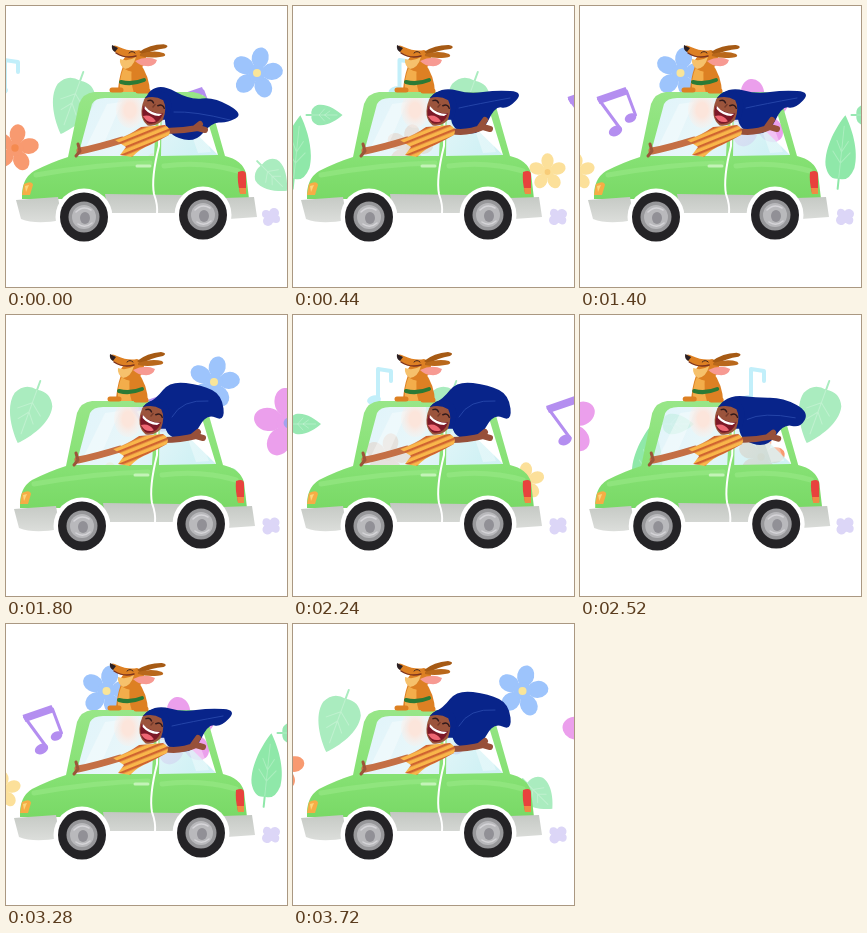
Recreate the animation shown at these times as an HTML page. Size 281 px wide and 281 px high, loop 3760 ms.

```html
<!DOCTYPE html>
<html lang="en">
<head>
<meta charset="utf-8">
<title>Road trip</title>
<style>
html, body { margin: 0; width: 100%; height: 100%; overflow: hidden; background: #fff; }
svg { display: block; width: 100vw; height: 100vh; }
.line { fill: none; stroke-linecap: round; stroke-linejoin: round; }
</style>
</head>
<body>
<svg viewBox="0 0 281 281">
  <defs>
    <linearGradient id="paint" x2="0" y2="1">
      <stop offset="0" stop-color="#98e688"/><stop offset=".6" stop-color="#86e174"/><stop offset="1" stop-color="#79d966"/>
    </linearGradient>
    <linearGradient id="glass" x2="1" y2=".3">
      <stop offset="0" stop-color="#d8f1f9"/><stop offset=".5" stop-color="#e2f4f8"/><stop offset="1" stop-color="#c6eef2"/>
    </linearGradient>
    <linearGradient id="chrome" x2="0" y2="1">
      <stop offset="0" stop-color="#c3c7c2"/><stop offset="1" stop-color="#dcdedb"/>
    </linearGradient>
    <radialGradient id="seat"><stop offset=".4" stop-color="#fce5db"/><stop offset="1" stop-color="#fceee8" stop-opacity=".3"/></radialGradient>
    <pattern id="stripes" width="6" height="6" patternUnits="userSpaceOnUse" patternTransform="rotate(68)">
      <rect width="6" height="6" fill="#f9b64a"/><rect width="2.4" height="6" fill="#cf6430"/>
    </pattern>
    <g id="wheel">
      <circle r="28.5" fill="#fff"/>
      <ellipse rx="24" ry="24.5" fill="#242326"/>
      <circle r="15.5" fill="#97979a"/>
      <circle r="12" fill="#b9b9bc"/>
      <ellipse cx="1" cy="1" rx="5" ry="6" fill="#919096"/>
      <path class="line" d="M-8 -5Q-1 -12 7 -7M-6 7Q1 12 8 6" stroke="#d5d4d8" stroke-width="1.5"/>
    </g>
  </defs>

  <g id="belt"></g>

  <g id="ride">
    <g id="dog">
      <path d="M110 88Q110 74 115 60L131 56Q142 70 142 88Z" fill="#dd8023"/>
      <path d="M112 86Q111 72 116 61L124 61Q122 76 126 87Z" fill="#f3ad4b"/>
      <path d="M104 41Q106 38 111 41Q122 46 131 44Q139 46 138 54Q135 64 125 66Q114 64 113 57L117 51Q107 49 104 41Z" fill="#dd8023"/>
      <path d="M112 53Q120 56 128 51Q125 62 117 63Q111 59 112 53Z" fill="#f6c16c"/>
      <path class="line" d="M108 47Q117 53 128 50" stroke="#7b3320" stroke-width="1.5"/>
      <path class="line" d="M121 47Q124 44 127 47" stroke="#41251d"/>
      <path d="M104 39L110 42L107 46Q103 44 104 39Z" fill="#2c2023"/>
      <path d="M127 55Q139 49 149 54Q147 61 138 60Q132 60 127 55Z" fill="#f79a92"/>
      <g id="ears" fill="#a65a14">
        <path d="M131 46Q141 38 155 37Q162 38 157 41Q145 43 135 49Z"/>
        <path d="M132 48Q146 43 156 46Q160 49 152 50Q141 52 132 50Z" fill="#b9681b"/>
      </g>
      <path class="line" d="M113 76Q124 79 136 74" stroke="#2b7a35" stroke-width="4"/>
    </g>

    <path d="M69 151L84 92H152L211 150Z" fill="url(#glass)" opacity=".8"/>
    <path d="M78 141L99 98L114 96L94 142ZM172 96L184 94L203 146L190 147Z" fill="#fff" opacity=".35"/>
    <ellipse cx="122" cy="104" rx="14" ry="18" fill="url(#seat)"/>
    <path fill="url(#paint)" fill-rule="evenodd" d="M14 193Q13 173 26 165Q44 156 60 151L71 98Q75 87 86 86L185 86Q198 88 202 97L217 150Q234 154 238 167L241 193Z
      M70 150L146 150L149 92L97 92Q87 92 84 98ZM153 150L210 149L195 100Q192 94 184 92L154 92Z"/>
    <path class="line" d="M28 169Q90 158 142 157M156 160Q195 155 230 165" stroke="#a0eb8f" stroke-width="5" opacity=".45"/>
    <path d="M97 188L174 189L172 207L100 207ZM8 194L50 191L54 214Q28 219 13 213ZM217 192L246 191L249 211L221 213Z" fill="url(#chrome)"/>
    <path class="line" d="M152 89L151 140Q143 172 146 188Q150 199 149 208" stroke="#fff" stroke-width="2"/>
    <path class="line" d="M129 160H142" stroke="#c4f3b8" stroke-width="3"/>
    <path d="M230 166Q238 163 238 169L238 187H232Q229 175 230 166Z" fill="#e8423d"/>
    <path d="M231 182H238V188H232Z" fill="#f08a44"/>
    <path d="M16 178Q24 174 25 179L22 189H14Z" fill="#f6ad45"/>
    <path d="M17 180L21 179L18 186Z" fill="#fbd67c"/>
    <use href="#wheel" x="76" y="211"/>
    <use href="#wheel" x="195" y="209"/>
    <path class="line" d="M104 84H113M130 85H140" stroke="#dd8023" stroke-width="5"/>

    <path id="hair" fill="#08248a"/>
    <path id="shine" class="line" stroke="#2444a8"/>
    <path class="line" d="M72 145Q88 142 114 134" stroke="#c46f45" stroke-width="7"/>
    <path class="line" d="M70 138L72 145L68 150" stroke="#9c5539" stroke-width="3"/>
    <path id="arm" class="line" stroke="#97503a" stroke-width="6"/>
    <path d="M107 134Q122 129 133 121L157 119Q164 123 161 129Q152 134 142 139Q133 142 124 151L112 149L118 141Z" fill="url(#stripes)"/>
    <g transform="rotate(22 147 104)">
      <path d="M133 98Q134 88 148 88Q160 91 160 104Q157 119 146 121Q133 117 133 98Z" fill="#9b543c"/>
      <path d="M133 97Q137 84 150 84Q162 87 163 108L158 110Q158 98 151 92Q141 90 133 97Z" fill="#08248a"/>
      <path d="M135 104Q145 109 156 104Q156 118 145 119Q135 116 135 104Z" fill="#7c1827"/>
      <path d="M136 104Q145 109 155 105L153 108Q145 111 137 107Z" fill="#fff"/>
      <path d="M138 114Q145 109 152 114Q146 120 138 114Z" fill="#ee6673"/>
      <path class="line" d="M137 98Q140 95 143 98M148 99Q152 95 155 99" stroke="#30191b" stroke-width="1.4"/>
      <path class="line" d="M145 99L144 102" stroke="#753a2a" stroke-width="1.5"/>
    </g>
  </g>

  <g id="puff" fill="#dcd6f7">
    <circle cx="260" cy="208" r="4"/><circle cx="268" cy="207" r="5"/><circle cx="262" cy="215" r="5"/><circle cx="270" cy="213" r="4"/><circle cx="265" cy="211" r="6"/>
  </g>
</svg>
<script>
const LOOP = 3760, STEPS = 48, STRIDE = 21.5, SPAN = STRIDE * STEPS / 2;
const $ = id => document.getElementById(id);

const flower = (r, color, heart, turn) => {
  let petals = '';
  for (let i = 0; i < 5; i++)
    petals += `<ellipse cy="${-r * .62}" rx="${r * .34}" ry="${r * .42}" transform="rotate(${turn + i * 72})"/>`;
  return `<g fill="${color}">${petals}<circle r="${r * .36}"/></g><circle r="${r * .16}" fill="${heart}"/>`;
};

// Leaf with its tip pointing up, then turned
const leaf = (w, h, color, turn) => `<g transform="rotate(${turn})">
  <path fill="${color}" d="M0 ${-h}C${w * .5} ${-h * .7} ${w * 1.2} ${-h * .1} ${w} ${h * .4}Q${w * .7} ${h * .8} 0 ${h * .72}Q${-w * .7} ${h * .8} ${-w} ${h * .4}C${-w * 1.2} ${-h * .1} ${-w * .5} ${-h * .7} 0 ${-h}Z"/>
  <path class="line" stroke="${color}" stroke-width="2" d="M0 ${h * .6}V${h}"/>
  <path class="line" stroke="#fff" stroke-opacity=".25" d="M0 ${-h * .7}V${h * .7}M${-w * .6} 0L0 ${h * .3}L${w * .6} 0M${-w * .4} ${-h * .3}L0 0L${w * .4} ${-h * .3}"/></g>`;

const note = `<path class="line" stroke="#c2effa" stroke-width="4" d="M-3 14V-16L10 -14V-4"/>
  <ellipse cx="-7" cy="15" rx="7" ry="4.5" fill="#c2effa" transform="rotate(-12 -7 15)"/>`;
const pair = `<g fill="#b48ef0"><path d="M-19 -14L10 -24L13 -17L-16 -7Z"/>
  <ellipse cx="0" cy="20" rx="7" ry="5" transform="rotate(-25 0 20)"/><ellipse cx="15" cy="7" rx="6" ry="4.5" transform="rotate(-25 15 7)"/></g>
  <path class="line" stroke="#b48ef0" stroke-width="3" d="M-17 -12L5 18M11 -20L20 4"/>`;

const items = [
  [66, 97, leaf(20, 33, '#aaecbf', 200)],
  [2, 70, note],
  [9, 142, flower(23, '#f89a70', '#f58a4f', 10)],
  [-76, 109, leaf(10, 18, '#98e8b2', 90)],
  [-104, 146, leaf(14.5, 37, '#8fe8a9', 6)],
  [-190, 108, flower(34, '#eb9fec', '#a3a2ee', -8)],
  [251, 67, flower(25, '#9dc4fc', '#f9e59a', 12)],
  [266, 170, leaf(15, 21, '#aaecbf', 135)],
  [186, 105, pair],
  [147, 166, flower(18, '#fce09a', '#f8cc78', 0)]
].map(([x, y, art]) => {
  const node = document.createElementNS('http://www.w3.org/2000/svg', 'g');
  node.innerHTML = art;
  $('belt').append(node);
  return { x, y, node };
});

const high = [134, 92, 150, 84, 164, 66, 196, 70, 216, 80, 219, 107, 200, 98, 186, 126, 160, 122, 158, 98];
const out = [134, 92, 152, 81, 176, 88, 204, 84, 231, 86, 215, 103, 202, 100, 188, 130, 158, 124, 158, 98];
const low = [134, 92, 152, 77, 182, 94, 206, 91, 236, 108, 219, 117, 204, 116, 186, 138, 156, 126, 158, 98];
const mix = (a, b, f) => a.map((v, i) => v + (b[i] - v) * f);
const poses = [low, mix(low, high, .4), mix(low, high, .75), high, high, out];
const drop = [1, .6, .25, 0, 0, 0];

// Closed curve through the midpoints of neighbouring points
function blob(p) {
  const n = p.length, mid = i => `${(p[i % n] + p[(i + 2) % n]) / 2} ${(p[(i + 1) % n] + p[(i + 3) % n]) / 2}`;
  let d = 'M' + mid(n - 2);
  for (let i = 0; i < n; i += 2) d += `Q${p[i]} ${p[i + 1]} ${mid(i)}`;
  return d + 'Z';
}

function draw(now) {
  const t = now % LOOP, step = Math.floor(t * STEPS / LOOP);
  for (const { x, y, node } of items) {
    const shift = (x + step * STRIDE + 120 + SPAN) % SPAN - 120;
    node.setAttribute('transform', `translate(${shift} ${y})`);
  }
  const pose = Math.floor(t / 80) % 6, p = poses[pose], k = drop[pose];
  $('hair').setAttribute('d', blob(p));
  $('shine').setAttribute('d', `M166 ${102 + k * 4}Q${p[6] - 20} ${p[7] + 14} ${p[8] - 14} ${p[9] + 6}`);
  const lift = pose === 5 ? 3 : 0;
  $('arm').setAttribute('d', `M158 125Q174 ${125 + lift} 190 ${121 + k}L197 ${123 + k}M187 ${121 + k}L192 ${117 - lift + k}`);
  $('ride').setAttribute('transform', `translate(${2 * k} 0)`);
  $('ears').setAttribute('transform', `rotate(${pose === 5 ? 5 : k * 3} 133 48)`);
  $('puff').setAttribute('transform', `rotate(${pose % 3 * 8} 265 211)`);
}

const start = performance.now();
(function tick() {
  draw(performance.now() - start);
  requestAnimationFrame(tick);
})();
</script>
</body>
</html>
```
